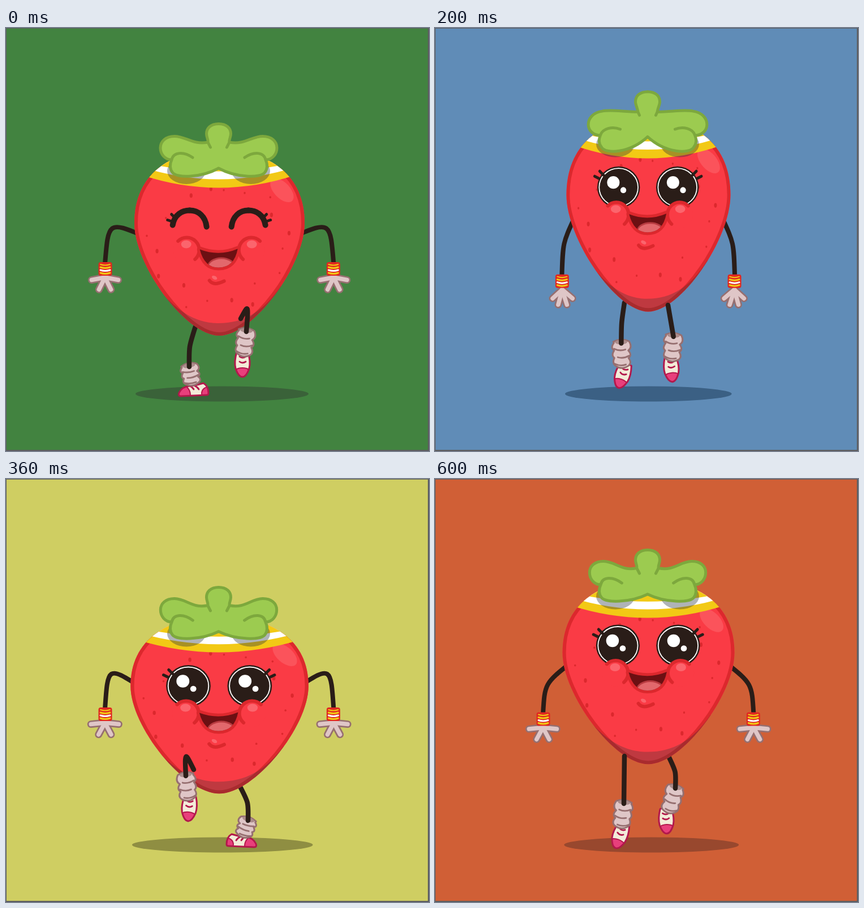
Write an HTML page with a canvas that moves like this. It is 748 px wide and 748 px high and loops after 0.64 s.

```html
<!DOCTYPE html>
<html lang="en">
<head>
<meta charset="utf-8">
<title>Dancing strawberry</title>
<style>
html, body { margin: 0; width: 100%; height: 100%; overflow: hidden; background: #5c5c5f; }
canvas { display: block; }
</style>
</head>
<body>
<canvas id="stage" width="748" height="748"></canvas>
<script>
const c = document.getElementById('stage').getContext('2d');
const INK = '#2a1d18', RED = '#fa3b45', EDGE = '#dc282d', PALE = '#fb656d';
const YELLOW = '#f2c915', SOCK = '#dfc6c7', SOCK_EDGE = '#966f70', MAGENTA = '#b3184c', PINK = '#e83f7c';
const SCENES = [['#428340', '#3a6239'], ['#608cb7', '#3b6084'], ['#cfce62', '#8f8e42'], ['#d05f36', '#98482e']];

// y: body height, squash: wider and shorter, air: 1 off the ground
// elbow and wrist are points; a foot has ankle x, ankle y, shoe x and turn
const LAND = {
  y: 328, squash: 0, air: 0, elbow: [181, 342], wrist: [175, 417],
  bend: 6, back: [324, 599, 332, 1.1], front: [425, 537, 418, 0]
};
const SQUASH = {
  y: 350, squash: .045, air: 0, elbow: [180, 331], wrist: [175, 407],
  bend: 9, back: [319, 604, 331, 1.1], front: [429, 525, 423, -.1]
};
const STRETCH = {
  y: 292, squash: -.06, air: 1, elbow: [242, 410], wrist: [241, 471],
  bend: 0, back: [333, 578, 328, .45], front: [426, 547, 417, .05]
};
const FALL = {
  y: 293, squash: .01, air: 1, elbow: [194, 364], wrist: [191, 418],
  bend: 8, back: [322, 547, 338, .04], front: [413, 574, 420, -.35]
};

function mix(a, b, k) {
  if (typeof a === 'number') return a + (b - a) * k;
  const out = Array.isArray(a) ? [] : {};
  for (const key in a) out[key] = mix(a[key], b[key], k);
  return out;
}
function poseAt(step, second) {
  if (step < 3) return step ? SQUASH : LAND;
  const k = Math.max(0, (step - 4) / 3);
  const hop = 66 * k * (1 - k), lift = hop + (second ? 2.5 * k : 0);
  const p = mix(STRETCH, FALL, k);
  p.y -= lift;
  p.elbow[1] -= lift;
  p.wrist[1] -= lift;
  p.back[1] -= hop * .7;
  p.front[1] -= hop * .7;
  return p;
}
// the parts that simply follow the body
function follow(p) {
  return {
    ...p,
    sx: 1 + p.squash,
    sy: 1 - p.squash,
    top: p.y - 161 - 6.5 * p.air,
    face: p.y + 54.5 - 12 * p.air,
    droop: Math.max(-.1, Math.min(1, -p.squash * 17))
  };
}

function paint(fill, stroke, w) {
  if (fill) { c.fillStyle = fill; c.fill(); }
  if (stroke) { c.strokeStyle = stroke; c.lineWidth = w; c.stroke(); }
}
function oval(x, y, rx, ry, fill, rot = 0) {
  c.beginPath();
  c.ellipse(x, y, rx, ry, rot, 0, 7);
  paint(fill);
}
function line(color, w, x, y, ...p) {
  c.beginPath();
  c.moveTo(x, y);
  if (p.length === 2) c.lineTo(...p);
  else if (p.length === 4) c.quadraticCurveTo(...p);
  else c.bezierCurveTo(...p);
  paint(null, color, w);
}
function at(x, y, rot, draw) {
  c.save();
  c.translate(x, y);
  c.rotate(rot);
  draw();
  c.restore();
}
function mirrored(axis, draw) {
  c.save();
  c.translate(axis * 2, 0);
  c.scale(-1, 1);
  draw();
  c.restore();
}

function drawArm({ y, squash, sx, elbow, wrist, droop }) {
  line(INK, 8, 376 - 134 * sx, y + 39 - 500 * squash, ...elbow, ...elbow, ...wrist);
  at(...wrist, 0, () => {
    const fan = .92 - .57 * droop;
    for (const [w, color] of [[13, SOCK_EDGE], [7.5, SOCK]]) {
      for (let i = 0; i < 4; i++) {
        const a = (i - 1.5) * fan, len = 24 + 7 * droop * Math.cos(2 * a);
        line(color, w, droop, 24, droop * 2 + Math.sin(a) * len, 24 + Math.cos(a) * len);
      }
    }
    c.beginPath();
    c.roundRect(-11.5, -3, 24, 24, 4);
    paint('#e12720');
    for (let i = 0; i < 4; i++) {
      const sy = 2 + i * 5;
      line(i === 2 ? '#fff' : YELLOW, i ? 3 : 2, -8, sy - 1, 0, sy + 2, 9, sy - 1);
    }
  });
}

function shoe(path, trim) {
  const shape = new Path2D(path);
  c.fillStyle = '#f3ebd8';
  c.fill(shape);
  c.save();
  c.clip(shape);
  c.beginPath();
  trim();
  paint(PINK, MAGENTA, 2);
  c.restore();
  c.strokeStyle = MAGENTA;
  c.lineWidth = 3;
  c.stroke(shape);
}
function frontShoe() {
  shoe('M-10-21Q0-25 10-21Q15-4 12 8Q7 23 0 23Q-7 23-12 8Q-15-4-10-21Z', () => c.ellipse(0, 26, 22, 19, 0, 0, 7));
  for (const y of [-13, -4]) line(MAGENTA, 2.8, -5, y, 0, y + 4, 6, y);
}
function sideShoe() {
  shoe('M17-13Q26-8 26 5Q26 8 22 8L-23 10Q-28 10-26 4Q-21-7-7-8Q5-9 17-13Z', () => {
    c.arc(-25, 8, 19, 0, 7);
    c.moveTo(36, 5);
    c.arc(25, 5, 11, 0, 7);
  });
  for (const x of [-7, 2]) line(MAGENTA, 2.8, x, -8, x + 5, -6, x + 7, -2);
}
function sock(len) {
  const s = len / 3;
  c.beginPath();
  c.moveTo(-14, -3);
  c.quadraticCurveTo(0, -10, 14, -3);
  for (let i = 0; i < 3; i++) c.quadraticCurveTo(20 - i, (i + .6) * s, 12, (i + 1) * s);
  c.quadraticCurveTo(0, len + 8, -11, len);
  for (let i = 2; i >= 0; i--) c.quadraticCurveTo(-20 + i, (i + .6) * s, -13, i * s - 1);
  c.closePath();
  paint(SOCK, SOCK_EDGE, 3);
  oval(0, -2, 11, 4, '#ab8c8b');
  for (let i = 0; i < 3; i++) {
    const side = i % 2 ? 1 : -1, y = (i + .7) * s;
    line(SOCK_EDGE, 2.8, side * 13, y, side * 3, y + s * .4, -side * 7, y + 2);
  }
}
function drawLeg(hip, kneeX, kneeY, [ax, ay, sx, turn]) {
  const sy = Math.min(ay + 57, 641), dx = (sx - ax) * .7, dy = (sy - ay) * .7;
  const side = turn > .4, mx = (hip[0] + ax) / 2 + kneeX, my = (hip[1] + ay) / 2 + kneeY;
  at(sx, sy, side ? turn - 1.1 : turn, side ? sideShoe : frontShoe);
  at(ax, ay, Math.atan2(-dx, dy), () => sock(Math.hypot(dx, dy)));
  line(INK, 8.5, ...hip, mx, my, mx, my, ax, ay);
}
function backLeg({ y, sy, bend, back }) {
  drawLeg([335, y + 216 * sy - 16], -bend, 0, back);
}
function frontLeg({ air, front }) {
  const bent = 1 - air;
  drawLeg([415 - 3 * air, 514 - 24 * air], 9 * bent, -38 * bent, front);
}

const BODY = new Path2D('M377 216C288 216 227 260 227 345C227 420 318 544 377 544' +
  'C437 544 528 420 528 345C528 260 467 216 377 216Z');

function stripe(y, ctrl, color) {
  c.beginPath();
  c.moveTo(240, y);
  c.quadraticCurveTo(376, ctrl, 512, y);
  c.lineTo(512, 190);
  c.lineTo(240, 190);
  paint(color);
}
function seeds() {
  for (let i = 0; i < 19; i++) {
    const a = i * 2.4, r = .78 + .12 * Math.sin(i * 5);
    const y = 390 + Math.sin(a) * r * 145;
    const x = 376 + Math.cos(a) * r * (145 - Math.max(0, y - 390) * .3);
    const big = i % 2;
    oval(x, y, big ? 2.6 : 1.7, big ? 4 : 2, EDGE);
  }
}
function drawBody({ y, top, sx, sy, droop }) {
  c.save();
  c.translate(376, y);
  c.scale(sx, sy);
  c.translate(-376, -328);
  c.fillStyle = RED;
  c.fill(BODY);
  c.clip(BODY);
  oval(488, 287, 26, 14, '#fb535b', .8);
  c.strokeStyle = EDGE;
  c.lineWidth = 12;
  c.stroke(BODY);
  seeds();
  c.beginPath();
  c.moveTo(252, 436);
  c.bezierCurveTo(300, 510, 345, 522, 376, 522);
  c.bezierCurveTo(420, 522, 455, 502, 486, 456);
  c.lineTo(530, 560);
  c.lineTo(230, 560);
  paint('rgba(20,50,50,.26)');
  stripe(260, 305, YELLOW);
  stripe(246, 289, '#fff');
  stripe(237, 270, YELLOW);
  c.translate(376, 328);
  c.scale(1 / sx, 1 / sy);
  c.translate(-376, -y);
  // shade cast by the leaf
  c.beginPath();
  for (const s of [-1, 1]) {
    const low = top + 86 + 15 * droop, high = top + 30 + 42 * droop;
    c.moveTo(376 + s * 57 + 34, low);
    c.ellipse(376 + s * 57, low, 34, 23, 0, 0, 7);
    c.moveTo(376 + s * 86 + 23, high);
    c.ellipse(376 + s * 86, high, 23, 26, 0, 0, 7);
  }
  paint('rgba(40,50,62,.37)');
  c.restore();
}

function halfLeaf({ top, droop: d }) {
  const start = [357 + 3 * d, 35 + 5 * d], peak = [298 - 4 * d, 24.5 + 20 * d];
  const tip = [273 - 3 * d, 45 + 25 * d], tuck = [293 - d, 66 + 22 * d];
  const outline = () => {
    c.beginPath();
    c.moveTo(376, 2.5);
    c.bezierCurveTo(361, 2.5, 354.5, 11, 354.5, 20);
    c.bezierCurveTo(354.5, 26, 358, 31, ...start);
    c.bezierCurveTo(330, 40 - 4 * d, peak[0] + 20 - 9 * d, peak[1] - 5 * d, ...peak);
    c.bezierCurveTo(peak[0] - 16, peak[1] + 4 * d, tip[0], tip[1] - 11, ...tip);
    c.bezierCurveTo(tip[0], tip[1] + 11, tuck[0] - 12, tuck[1], ...tuck);
    c.bezierCurveTo(289, 74 + 22 * d, 290, 83 + 19 * d, 294, 88 + 19 * d);
    c.bezierCurveTo(301, 99 + 24 * d, 345, 98 + 21 * d, 376, 81 + 2 * d);
  };
  c.save();
  c.translate(0, top);
  outline();
  paint('#9ccb50');
  outline();
  c.moveTo(...tuck);
  c.bezierCurveTo(296, 52 + 24 * d, 314, 51 + 20 * d, 330 - 4 * d, 62 + 11 * d);
  c.moveTo(...start);
  c.lineTo(361.5, 44);
  paint(null, '#7da83d', 5);
  c.restore();
}

function openEye(x, gx) {
  oval(x, -38.5, 38.5, 37, INK);
  c.beginPath();
  c.ellipse(x, -38.5, 35, 33.5, 0, 0, 7);
  paint(null, '#fff', 1.8);
  oval(x + gx, -47, 11.2, 11.2, '#fff');
  oval(x + gx + 18, -33.5, 5.3, 5.3, '#fff');
}
function cheek(blink) {
  if (blink) {
    line(INK, 10, -82, -34, -79, -53, -65, -60, -52, -60);
    line(INK, 10, -52, -60, -36, -60, -24, -49, -22, -31);
    line(INK, 5, -84, -53, -77, -46);
    line(INK, 5, -91, -43, -82, -40);
  } else {
    line(INK, 5, -87, -67, -80, -60);
    line(INK, 5, -96, -58, -88, -54);
  }
  oval(-57, 10, 24, 24, RED);
  c.beginPath();
  c.arc(-57, 10, 22, -2.35, .85);
  paint(null, EDGE, 6);
  oval(-58, 0, 9, 7, PALE);
}
function drawFace({ face, squash }, blink) {
  c.save();
  c.translate(376.7, face);
  c.scale(1 + squash * .5, 1);
  if (!blink) {
    openEye(-53, -9.5);
    openEye(53, -8);
  }
  cheek(blink);
  mirrored(0, () => cheek(blink));
  const mouth = new Path2D('M-34 9Q0 22 33 8Q27 41-1 41Q-26 41-34 9Z');
  c.strokeStyle = EDGE;
  c.lineWidth = 10;
  c.stroke(mouth);
  c.fillStyle = '#6c1013';
  c.fill(mouth);
  c.save();
  c.clip(mouth);
  oval(4, 38, 24, 15, '#b83b40');
  oval(4, 41, 23, 15, '#e2686c');
  c.restore();
  line(EDGE, 6, -17, 64, -12, 71, -4, 71.5, 9, 65);
  oval(-8, 59, 5, 3, PALE, .5);
  c.restore();
}

function draw(ms) {
  const slot = Math.floor(ms % 640 / 40), step = slot % 8, second = slot > 7;
  const [back, shade] = SCENES[(second ? 2 : 0) + (step > 2 ? 1 : 0)];
  const p = follow(poseAt(step, second)), blink = slot < 3;
  const leg = part => second ? mirrored(373.5, () => part(p)) : part(p);
  const both = (axis, part) => { part(p); mirrored(axis, () => part(p)); };
  c.lineCap = c.lineJoin = 'round';
  c.fillStyle = '#5c5c5f';
  c.fillRect(0, 0, 748, 748);
  c.fillStyle = back;
  c.fillRect(1, 1, 745, 745);
  oval(382 - 7.5 * p.droop, 647, 153 * p.sx, 13.5, shade);
  both(377.2, drawArm);
  leg(backLeg);
  drawBody(p);
  both(376, halfLeaf);
  drawFace(p, blink);
  leg(frontLeg);
}

const begin = performance.now();
function tick() {
  draw(performance.now() - begin);
  requestAnimationFrame(tick);
}
tick();
</script>
</body>
</html>
```
